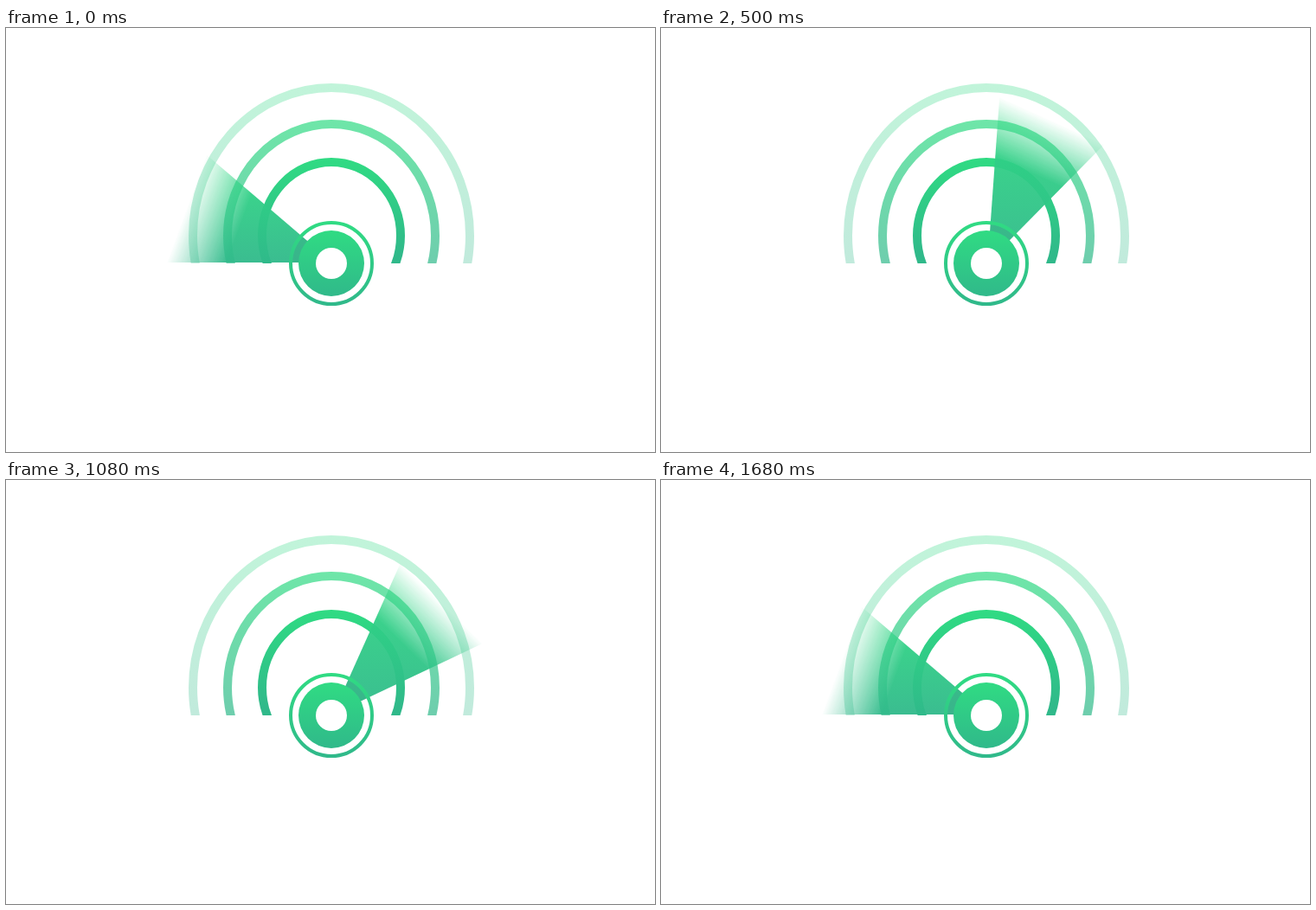
Animation, 750 px wide and 490 px high, one loop 1.86 s. Source, as an HTML page:

```html
<!DOCTYPE html>
<html lang="en">
<head>
<meta charset="utf-8">
<title>Radar scan</title>
<style>
  html, body { margin: 0; width: 100%; height: 100%; overflow: hidden; background: #fff; }
  svg { display: block; }
  .ring { fill: none; stroke-width: 10; }
</style>
</head>
<body>
<svg width="750" height="490" viewBox="0 0 750 490">
  <defs>
    <linearGradient id="green" x1="0" y1="0" x2="0" y2="1">
      <stop offset="0" stop-color="#30db83"/>
      <stop offset="1" stop-color="#30b98a"/>
    </linearGradient>
    <linearGradient id="arc1" href="#green" gradientUnits="userSpaceOnUse" x2="0" y1="64" y2="272"/>
    <linearGradient id="arc2" href="#green" gradientUnits="userSpaceOnUse" x2="0" y1="106" y2="268"/>
    <linearGradient id="arc3" href="#green" gradientUnits="userSpaceOnUse" x2="0" y1="150" y2="262"/>
    <linearGradient id="beamFill" href="#green" gradientUnits="userSpaceOnUse" x2="0" y1="150" y2="271"/>
    <linearGradient id="fade" gradientUnits="userSpaceOnUse" x1="-107.9" y1="-39.8" x2="-168.9" y2="-62.3">
      <stop offset="0" stop-color="#fff"/>
      <stop offset="1" stop-color="#fff" stop-opacity="0"/>
    </linearGradient>
    <clipPath id="upper"><rect width="750" height="272"/></clipPath>
    <mask id="beam" maskUnits="userSpaceOnUse" x="0" y="0" width="750" height="490">
      <path id="wedge" d="M0 0H-210L-159.7 -136.4Z" fill="url(#fade)"/>
    </mask>
  </defs>

  <g class="ring" clip-path="url(#upper)">
    <ellipse cx="376" cy="240" rx="160" ry="171" stroke="url(#arc1)" opacity=".3"/>
    <ellipse cx="376" cy="240" rx="120" ry="129" stroke="url(#arc2)" opacity=".7"/>
    <ellipse cx="376" cy="240" rx="80" ry="85" stroke="url(#arc3)"/>
  </g>

  <g mask="url(#beam)">
    <rect width="750" height="490" fill="url(#beamFill)" opacity=".95"/>
    <circle cx="376" cy="272" r="45" fill="#32826e" opacity=".15"/>
  </g>

  <circle cx="376" cy="272" r="47" fill="none" stroke="url(#green)" stroke-width="4"/>
  <circle cx="376" cy="272" r="38" fill="url(#green)"/>
  <circle cx="376" cy="272" r="18" fill="#fff"/>
</svg>
<script>
  const LOOP = 1860, STEP = 20, LEG = 280, SPREAD = 40.5, REACH = 187;
  const APEX = { x: 377.5, y: 271 };
  // Sweep angle at the end of each leg, out and back.
  const KEYS = [0, 39.5, 109, 145, 109, 39.5, 0];
  const wedge = document.getElementById('wedge');
  const beamFill = document.getElementById('beamFill');

  function angleAt(ms) {
    const leg = Math.min(ms / LEG, KEYS.length - 1);
    const i = Math.min(Math.floor(leg), KEYS.length - 2);
    return KEYS[i] + (KEYS[i + 1] - KEYS[i]) * (leg - i);
  }

  function draw(now) {
    const angle = angleAt(Math.floor((now % LOOP) / STEP) * STEP);
    wedge.setAttribute('transform', `translate(${APEX.x} ${APEX.y}) rotate(${angle})`);
    // The fill stays upright and starts at the highest point of the beam.
    const peak = Math.min(Math.max(90, angle), angle + SPREAD);
    beamFill.setAttribute('y1', APEX.y - REACH * Math.sin(peak * Math.PI / 180));
  }

  const start = performance.now();
  function tick() {
    draw(performance.now() - start);
    requestAnimationFrame(tick);
  }
  tick();
</script>
</body>
</html>
```
